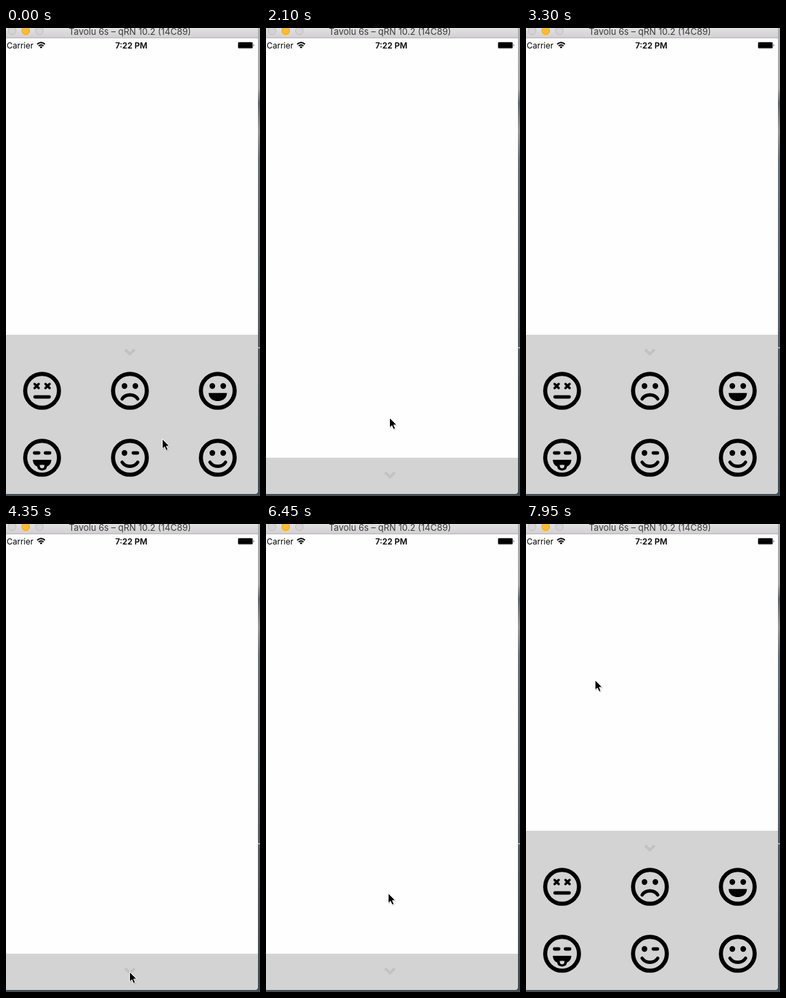
An HTML page for the animation above (8 s loop, 373 px wide and 685 px high).

```html
<!DOCTYPE html>
<html lang="en">
<head>
<meta charset="utf-8">
<title>Emoji drawer</title>
<style>
  html, body { margin: 0; width: 100%; height: 100%; overflow: hidden; background: #4b565e; }
  svg { display: block; width: 100%; height: 100%; }
  text { font-family: Inter, "Open Sans", sans-serif; font-size: 12px; }
  .line { fill: none; stroke: #000; stroke-width: 4.8; stroke-linecap: round; }
  .cross { stroke-width: 3.5; }
</style>
</head>
<body>
<svg viewBox="0 0 373 685">
  <defs>
    <linearGradient id="bar" x2="0" y2="1">
      <stop stop-color="#e3e1e3"/><stop offset="1" stop-color="#d1cfd1"/>
    </linearGradient>
    <linearGradient id="desk" x2="0" y2="1">
      <stop stop-color="#a9adb0"/><stop offset=".13" stop-color="#a5a7a8"/>
      <stop offset=".16" stop-color="#5d656c"/><stop offset=".22" stop-color="#a09892"/>
      <stop offset=".28" stop-color="#65727b"/><stop offset="1" stop-color="#3f4b54"/>
    </linearGradient>
    <clipPath id="window"><path d="M0 0H370V677Q370 682 365 682H0Z"/></clipPath>

    <circle id="ring" r="24.8" fill="none" stroke="#000" stroke-width="6"/>
    <circle id="dot" r="4.2"/>
    <path id="dash" class="line" d="M-3.2 0H3.2"/>
    <path id="cross" class="line cross" d="M-3-3L3 3M3-3L-3 3"/>
    <path id="flat" class="line" d="M-10.5 9H10.5"/>
    <path id="smile" class="line" d="M-11.5 6.5C-6.5 14.5 6.5 14.5 11.5 6.5"/>
    <path id="frown" class="line" d="M-11.5 12C-6.5 4 6.5 4 11.5 12"/>
    <path id="grin" d="M-13.5 3.2H13.5C13 19 -13 19 -13.5 3.2Z"/>
    <g id="tongue">
      <path d="M-13.5 3H13.5C13.5 8 11 11.5 7 13C7 20.5 -7 20.5 -7 13C-11 11.5 -13.5 8 -13.5 3Z"/>
      <path d="M-3.3 10Q-1.7 11.5 0 10Q1.7 11.5 3.3 10V12.5C3.3 16.5 -3.3 16.5 -3.3 12.5Z" fill="#d3d3d3"/>
    </g>
  </defs>

  <rect width="373" height="685" fill="url(#desk)"/>
  <rect y="681" width="373" height="4" fill="#444f57"/>
  <path d="M370 468H373" stroke="#a3aaae" stroke-width="2"/>

  <g clip-path="url(#window)">
    <rect width="370" height="682" fill="#fefefe"/>
    <rect width="370" height="14" fill="url(#bar)"/>
    <rect y="14" width="370" height="1" fill="#b3b1b3"/>
    <g fill="#d5d3d5" stroke="#bfbdbf">
      <circle cx="9" cy="4" r="5.7"/>
      <circle cx="29" cy="4" r="5.7" fill="#fdbd2e" stroke="#e2a32b"/>
      <circle cx="49" cy="4" r="5.7"/>
    </g>
    <text x="182" y="9.5" text-anchor="middle" fill="#3c3b3c" style="font-size:13px">Tavolu 6s – qRN 10.2 (14C89)</text>

    <text x="1" y="30">Carrier</text>
    <g fill="none" stroke="#000" stroke-width="2">
      <path d="M45.8 23.8Q51.5 18.8 57.2 23.8M48 26.3Q51.5 23.2 55 26.3"/>
      <path d="M49.4 27.5Q51.5 25.8 53.6 27.5L51.5 30Z" fill="#000" stroke="none"/>
    </g>
    <text x="184" y="30" text-anchor="middle" font-weight="600">7:22 PM</text>
    <rect x="340.5" y="20.5" width="22" height="9.5" rx="1.8" fill="none" stroke="#aaa" stroke-width=".8"/>
    <rect x="341" y="21" width="21" height="8.5" rx="1"/>
    <path d="M363.6 23.3Q365.4 25.2 363.6 27.2Z"/>

    <g id="panel">
      <rect width="370" height="243" fill="#d3d3d3"/>
      <path d="M175 21.5L182 28.2L189 21.5" fill="none" stroke="#c2c2c2" stroke-width="4"/>
    </g>
  </g>

  <g id="cursor">
    <path d="M1 2V16.5L4.6 13.4L7.2 18.8L10 17.6L7.6 12.4H12.2Z" opacity=".18"/>
    <path d="M.5 .5V15L3.8 12L6.2 17.4L8.9 16.2L6.6 11H11Z" stroke="#fff"/>
  </g>
</svg>
<script>
  const LOOP = 8000, STEP = 150;
  const OPEN = 449, CLOSED = 629, HANDLE = 26;
  const DECAY = 6.9, SWING = 11.95; // spring with a damping ratio of one half
  const IDLE = 1000; // the pointer is hidden during longer rests

  const faces = [
    "cross cross flat", "dot dot frown", "dot dot grin",
    "dash dash tongue", "dot dash smile", "dot dot smile"
  ];

  // Release times of the swipes, which close and open the panel in turn
  const swipes = [605, 2193, 3910, 6551];

  const grab = (time, edge) => ({ time, x: 181, y: edge + HANDLE });
  const route = [
    { time: 0, x: 229, y: 601 },
    grab(450, OPEN), grab(750, CLOSED),
    grab(1950, CLOSED), { time: 2400, x: 182, y: 400 },
    grab(3600, OPEN), grab(4050, CLOSED), grab(4650, CLOSED),
    { time: 5550, x: 175, y: 328 },
    grab(6200, CLOSED), { time: 6750, x: 177, y: 403 },
    { time: 7050, x: 178, y: 360 }, { time: 7650, x: 168, y: 537 },
    { time: 7950, x: 101, y: 228 }
  ];

  const panel = document.getElementById("panel");
  const cursor = document.getElementById("cursor");

  faces.forEach((face, i) => {
    const [left, right, mouth] = face.split(" ");
    const x = 53 + 129 * (i % 3), y = 82 + 98 * Math.floor(i / 3);
    panel.insertAdjacentHTML("beforeend", `<g transform="translate(${x} ${y})">
      <use href="#ring"/><use href="#${mouth}"/>
      <use href="#${left}" x="-8" y="-7"/><use href="#${right}" x="8" y="-7"/></g>`);
  });

  function panelTop(time) {
    const count = swipes.filter(start => start <= time).length;
    if (!count) return OPEN;
    const [from, to] = count % 2 ? [OPEN, CLOSED] : [CLOSED, OPEN];
    const t = (time - swipes[count - 1]) / 1000, phase = SWING * t;
    const rest = Math.exp(-DECAY * t) * (Math.cos(phase) + DECAY / SWING * Math.sin(phase));
    return Math.round(2 * (to + (from - to) * rest)) / 2;
  }

  function pointer(time) {
    const i = Math.max(1, route.findIndex(stop => stop.time >= time));
    const a = route[i - 1], b = route[i], span = b.time - a.time;
    if (span > IDLE && time < b.time) return null;
    const mix = axis => Math.round(a[axis] + (b[axis] - a[axis]) * (time - a.time) / span);
    return [mix("x"), mix("y")];
  }

  function draw(now) {
    const time = Math.floor(now % LOOP / STEP) * STEP;
    panel.setAttribute("transform", `translate(0 ${panelTop(time)})`);
    const at = pointer(time);
    cursor.style.display = at ? "" : "none";
    if (at) cursor.setAttribute("transform", `translate(${at})`);
    requestAnimationFrame(draw);
  }
  draw(0);
</script>
</body>
</html>
```
